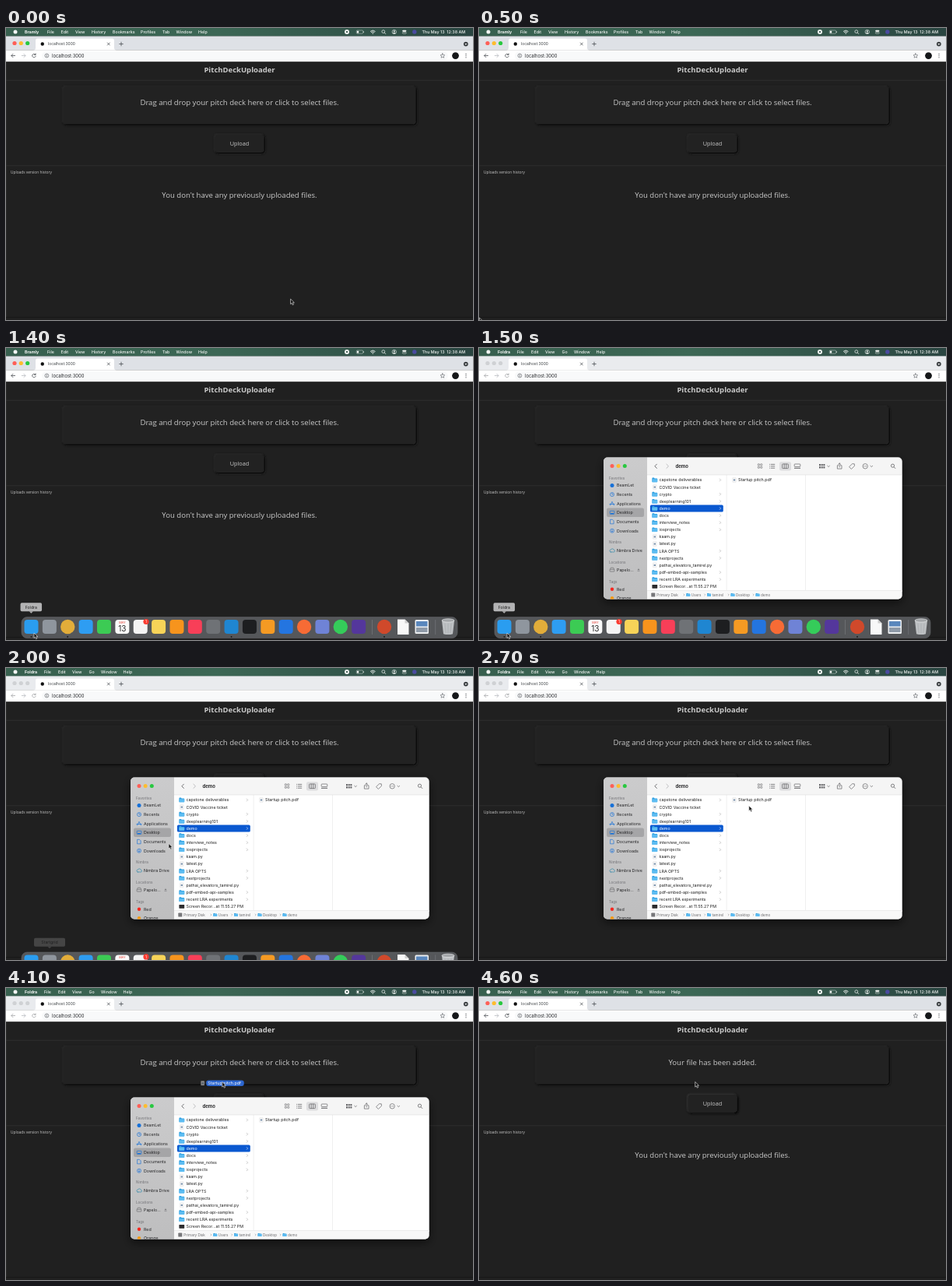
These frames come from a looping animation (600x375 px, 5 s). An HTML page:

```html
<!DOCTYPE html>
<html lang="en">
<head>
<meta charset="utf-8">
<title>Pitch deck upload</title>
<style>
html, body { margin: 0; width: 100%; height: 100%; overflow: hidden; background: #202020; }
svg { display: block; width: 100vw; height: 100vh; }
text { font-family: Inter, "Liberation Sans", sans-serif; white-space: pre; }
.page text { font-family: "Open Sans", "Noto Sans", sans-serif; }
</style>
</head>
<body>
<svg id="stage" viewBox="0 0 600 375" xmlns="http://www.w3.org/2000/svg"></svg>
<script>
const LOOP = 5000, STEP = 100;

// ---- drawing helpers ----
const rect = (x, y, w, h, fill, r = 0, extra = '') =>
  `<rect x="${x}" y="${y}" width="${w}" height="${h}" rx="${r}" fill="${fill}" ${extra}/>`;
const dot = (x, y, r, fill, extra = '') => `<circle cx="${x}" cy="${y}" r="${r}" fill="${fill}" ${extra}/>`;
const line = (d, color, w = 0.7, extra = '') =>
  `<path d="${d}" fill="none" stroke="${color}" stroke-width="${w}" stroke-linecap="round" stroke-linejoin="round" ${extra}/>`;
const shape = (d, fill, extra = '') => `<path d="${d}" fill="${fill}" ${extra}/>`;
// y is the middle of the capital letters
const text = (x, y, size, str, fill, extra = '') =>
  `<text x="${x}" y="${(y + size * 0.36).toFixed(2)}" font-size="${size}" fill="${fill}" ${extra}>${str}</text>`;
const group = (id, body, extra = '') => `<g id="${id}" ${extra}>${body}</g>`;
const MID = ' text-anchor="middle"', BOLD = ' font-weight="700"', MEDIUM = ' font-weight="500"';

const defs = `<defs>
  <linearGradient id="bar"><stop offset="0" stop-color="#38604f"/><stop offset=".45" stop-color="#3c6755"/>
    <stop offset="1" stop-color="#2a4541"/></linearGradient>
  <linearGradient id="side" x2="0" y2="1"><stop offset="0" stop-color="#cbcbcc"/><stop offset="1" stop-color="#bebebf"/></linearGradient>
  <filter id="raised" x="-20%" y="-40%" width="140%" height="190%">
    <feDropShadow dx="-1" dy="-1" stdDeviation="1" flood-color="#2b2b2b"/>
    <feDropShadow dx="1.4" dy="1.4" stdDeviation="1.6" flood-color="#141414"/></filter>
  <filter id="lifted" x="-20%" y="-40%" width="140%" height="190%">
    <feDropShadow dx="-1" dy="-1" stdDeviation="1" flood-color="#343434"/>
    <feDropShadow dx="1.6" dy="1.6" stdDeviation="1.6" flood-color="#0b0b0b"/></filter>
  <filter id="cast" x="-10%" y="-15%" width="120%" height="140%">
    <feDropShadow dx="0" dy="4" stdDeviation="6" flood-color="#000" flood-opacity=".6"/></filter>
  <clipPath id="frame"><rect x="160" y="140.5" width="383.5" height="182" rx="5"/></clipPath>
</defs>`;

// ---- menu bar ----
function menu(id, items) {
  return group(id, items.map(([x, label], i) =>
    text(x, 5, 5.3, label, '#f2f5f3', i ? MEDIUM : BOLD)).join(''));
}

function menuBar() {
  const w = '#f2f5f3';
  return rect(0, 0, 600, 10.3, 'url(#bar)') + dot(12, 5, 2.5, w) +
    menu('webMenu', [[24, 'Bramly'], [53, 'File'], [70.5, 'Edit'], [89, 'View'], [110, 'History'],
      [137, 'Bookmarks'], [173, 'Profiles'], [201, 'Tab'], [218.5, 'Window'], [247, 'Help']]) +
    menu('fileMenu', [[24, 'Foldra'], [49, 'File'], [67, 'Edit'], [85, 'View'], [106.5, 'Go'],
      [122, 'Window'], [150.5, 'Help']]) +
    dot(438, 5, 3, w) + rect(436.9, 3.9, 2.2, 2.2, '#4d6a60', 0.3) +
    rect(450.3, 3, 8.4, 4.2, 'none', 1, `stroke="${w}" stroke-width=".5" opacity=".8"`) +
    rect(451, 3.7, 2.2, 2.8, w, 0.4) + rect(459.2, 4.3, 0.7, 1.6, w) +
    line('M468.4 4.2q2.9-2.5 5.8 0M469.5 5.5q1.8-1.5 3.6 0', w, 0.9) + dot(471.3, 7, 0.7, w) +
    dot(484.8, 4.6, 1.9, 'none', `stroke="${w}" stroke-width=".7"`) + line('M486.3 6.1l1.6 1.6', w) +
    dot(498.8, 5, 2.7, 'none', `stroke="${w}" stroke-width=".6"`) + dot(498.8, 4.2, 1, w) + shape('M496.9 6.9q1.9-2.2 3.8 0z', w) +
    rect(509.2, 2.7, 5.2, 2, w, 1) + rect(509.4, 5.5, 4.9, 1.7, 'none', 0.9, `stroke="${w}" stroke-width=".5"`) +
    dot(524.8, 5, 2.7, '#4a4aa0') +
    text(534.5, 5, 5.3, 'Thu May 13  12:38 AM', w, MEDIUM);
}

// ---- browser frame ----
const lights = (xs, y, r, colors) => xs.map((x, i) => dot(x, y, r, colors[i % colors.length])).join('');
const RGB = ['#fe5f57', '#febc2e', '#28c840'];

function browser() {
  const ink = '#4d5156';
  return rect(0, 10.3, 600, 18, '#dee1e6') +
    group('pale', rect(0, 10.3, 600, 18, '#e9ebee') + lights([11, 19.3, 27.7], 19.5, 2.6, ['#cfd1d4'])) +
    group('vivid', lights([11, 19.3, 27.7], 19.5, 2.6, RGB)) +
    shape('M35 28.5q3 0 3-3V16q0-2.5 2.5-2.5h96q2.5 0 2.5 2.5v9.5q0 3 3 3z', '#fff') +
    dot(46.8, 20.5, 2.2, '#111') + text(54, 20.5, 4.95, 'localhost:3000', '#3c4043') +
    line('M130.3 19l3 3m0-3l-3 3M145.7 20.5h4.6m-2.3-2.3v4.6', ink, 0.8) +
    dot(590.8, 20.6, 2.9, '#3c4043') + shape('M589.3 20h3l-1.5 1.7z', '#fff') +
    rect(0, 28.3, 600, 14.9, '#fff') + rect(46, 30.3, 522, 10.8, '#f8f9fa', 5.4) +
    group('nav', line('M11.6 35.5H7m2-2.2l-2.2 2.2 2.2 2.2', ink, 0.8) +
      line('M37.9 34.2a2.3 2.3 0 1 0 .3 2.1M38.1 32.9v1.6h-1.6', ink, 0.8)) +
    line('M20.3 35.5h4.6m-2-2.2l2.2 2.2-2.2 2.2', '#b9bcc0', 0.8) +
    dot(52.4, 35.5, 2.4, 'none', `stroke="${ink}" stroke-width=".6"`) + line('M52.4 35.3v1.3m0-2.4v.1', ink, 0.6) +
    text(59, 35.5, 5.85, 'localhost:3000', '#27292c') +
    line('M560.9 32.7l.85 1.9 2 .2-1.5 1.4.4 2-1.75-1-1.75 1 .4-2-1.5-1.4 2-.2z', ink, 0.55) +
    dot(577.5, 35.6, 4.4, '#151719') +
    [33.4, 35.6, 37.8].map(y => dot(591, y, 0.65, ink)).join('');
}

// ---- web page ----
function page() {
  const ink = '#c9c9c9';
  const button = filter => rect(268.5, 137, 63, 23, '#202020', 4, `filter="url(#${filter})"`);
  return group('web',
    rect(0, 43.2, 600, 331.8, '#202020') +
    text(300, 53.6, 9.5, 'PitchDeckUploader', ink, MID + BOLD) +
    rect(0, 66.8, 600, 0.9, '#303030') + rect(0, 176.4, 600, 0.8, '#303030') +
    rect(0, 43.2, 0.6, 328, '#303030') + rect(0, 371, 600, 0.8, '#161616') +
    rect(73.5, 75.5, 453, 48, '#202020', 4, 'filter="url(#raised)"') +
    group('prompt', text(300, 95.8, 9.6, 'Drag and drop your pitch deck here or click to select files.', ink, MID)) +
    group('added', text(300, 95.8, 9.6, 'Your file has been added.', ink, MID)) +
    group('idle', button('raised')) + group('ready', button('lifted')) +
    text(300, 148.6, 7.3, 'Upload', ink, MID) +
    text(6, 185.4, 4.82, 'Uploads version history', ink) +
    text(300, 214.6, 9.54, "You don't have any previously uploaded files.", ink, MID), 'class="page"');
}

// ---- file window ----
const folder = (x, y, s = 1) =>
  `<g transform="translate(${x} ${y}) scale(${s})">` +
  shape('M-3.4-2.3q0-.6.6-.6h1.9l.8.8h2.9q.6 0 .6.6v3.6q0 .6-.6.6h-5.6q-.6 0-.6-.6z', '#2f9fe0') +
  rect(-3.4, -1.3, 6.8, 4, '#5cbcf2', 0.5) + '</g>';
const sheet = (x, y) => rect(x - 2.2, y - 2.8, 4.4, 5.6, '#fafafa', 0.4, 'stroke="#c9c9c9" stroke-width=".35"') +
  rect(x - 1.2, y - 1, 2.4, 2, '#7b93ad');
const chevron = (x, y, color, s = 1) => line(`M${x - 0.7 * s} ${y - 1.4 * s}l${1.4 * s} ${1.4 * s}l${-1.4 * s} ${1.4 * s}`, color, 0.55);

// A leading "/" marks a folder
const rows = ['/capstone deliverables', 'COVID Vaccine ticket', '/crypto', '/deeplearning101', '/demo', '/docs',
  '/interview_notes', '/iosprojects', 'kaam.py', 'latest.py', '/LRA OPTS', '/nextprojects',
  'pathai_elevators_tamirel.py', '/pdf-embed-api-samples', '/recent LRA experiments', 'Screen Recor...at 11.55.27 PM'];

function fileList() {
  return rows.map((row, i) => {
    const y = 169.5 + i * 9.12, on = row === '/demo', dir = row[0] === '/';
    const icon = dir ? folder(225.8, y) : i === 15 ? rect(222.4, y - 2.4, 6.8, 4.8, '#2b2b2d', 0.4) : sheet(225.8, y);
    return (on ? rect(220, y - 4.4, 93.8, 9, '#0a58d0', 1.6) : '') + icon +
      text(231.5, y, 5.3, dir ? row.slice(1) : row, on ? '#fff' : '#1e1e1e') +
      (dir ? chevron(310, y, on ? '#fff' : '#9a9a9a') : '');
  }).join('');
}

function sidebar() {
  const blue = '#1670d8';
  const heads = [[167, 'Favorites'], [249.7, 'Nimbra'], [275, 'Locations'], [300, 'Tags']];
  const items = [[176.5, 'BeamLet'], [188.1, 'Recents'], [199.7, 'Applications'], [211.3, 'Desktop'], [223, 'Documents'],
    [234.7, 'Downloads'], [260, 'Nimbra Drive'], [285, 'Papelo...'], [309.8, 'Red'], [321.3, 'Orange']];
  const ring = y => dot(171, y, 2.5, 'none', `stroke="${blue}" stroke-width=".65"`);
  return rect(160, 140, 56, 184, 'url(#side)') + rect(164, 205.6, 48, 11.4, '#a5a5a7', 2.2) +
    lights([171, 179.1, 187.3], 151.6, 2.5, RGB) +
    heads.map(([y, s]) => text(167, y, 4.6, s, '#7d7d80', MEDIUM)).join('') +
    items.map(([y, s]) => text(177, y, 5.3, s, '#232325')).join('') +
    dot(171, 176.5, 2.5, blue) + ring(188.1) + line('M171 186.5v1.7h1.2', blue, 0.6) +
    line('M168.6 202l2.4-4.7 2.4 4.7M167.8 200.5h6.4', blue, 0.7) +
    rect(168.2, 209.2, 5.7, 4.2, 'none', 0.7, `stroke="${blue}" stroke-width=".7"`) + rect(169, 212, 4, 1, blue) +
    line('M169 220.3h2.5l1.6 1.6v3.9H169z', blue, 0.65) +
    ring(234.7) + line('M171 233.3v2.6m-1-.9l1 1 1-1', blue, 0.6) +
    line('M169.3 262h3.9a1.3 1.3 0 0 0 .1-2.6 2 2 0 0 0-3.8-.4 1.5 1.5 0 0 0-.2 3z', '#2a86a8', 0.65) +
    rect(168.1, 284.3, 5.8, 2.8, 'none', 0.6, 'stroke="#606063" stroke-width=".6"') + line('M168.5 284l.9-1.8h3.2l.9 1.8', '#606063', 0.6) +
    shape('M203.4 285.2l1.6-1.9 1.6 1.9zM203.4 286h3.2v.6h-3.2z', '#77777a') +
    dot(171, 309.8, 2.2, '#f5271f') + dot(171, 321.3, 2.2, '#f59b14');
}

function toolbar() {
  const g = '#626265';
  const cell = (x, y) => rect(x, y, 2.1, 2.1, 'none', 0.4, `stroke="${g}" stroke-width=".6"`);
  const box = (x, y, w, h) => rect(x, y, w, h, 'none', 0.7, `stroke="${g}" stroke-width=".7"`);
  return rect(216, 140, 328, 23, '#f5f5f5') + rect(216, 162.7, 328, 0.5, '#d7d7d7') +
    line('M228.4 149.2l-2.6 2.6 2.6 2.6', g, 0.9) + line('M240.9 149.2l2.6 2.6-2.6 2.6', '#b6b6b8', 0.9) +
    text(252.5, 151.9, 6, 'demo', '#2c2c2e', BOLD) +
    cell(358.3, 148.8) + cell(361.7, 148.8) + cell(358.3, 152.2) + cell(361.7, 152.2) +
    line('M375.2 149.4h4.6M375.2 151.8h4.6M375.2 154.2h4.6M373.4 149.4h.1M373.4 151.8h.1M373.4 154.2h.1', g, 0.8) +
    rect(386, 146.2, 15, 11.2, '#dedee0', 2) + box(389.6, 149, 7.8, 5.6) + line('M392.2 149v5.6m2.6-5.6v5.6', g) +
    box(405.2, 149, 7.6, 3.4) + line('M405.4 154.3h7.2', g, 1) +
    [437, 439.7, 442.4].map(x => rect(x, 149, 2, 2.2, g, 0.3) + rect(x, 152.2, 2, 2.2, g, 0.3)).join('') +
    line('M447.7 151.3l1.4 1.3 1.4-1.3M502.9 151.3l1.4 1.3 1.4-1.3', g) +
    line('M461.8 150.8h-1.4v4.3h5.6v-4.3h-1.4M463.2 153v-5m-1.4 1.3l1.4-1.4 1.4 1.4', g) +
    line('M475.8 152.4l3.8-3.7 2.7.1.1 2.7-3.7 3.7z', g) +
    dot(496.2, 151.8, 3.2, 'none', `stroke="${g}" stroke-width=".7"`) + line('M494.7 151.8h.1m1.3 0h.1m1.3 0h.1', g, 0.8) +
    dot(531.5, 151.2, 2.1, 'none', `stroke="${g}" stroke-width=".8"`) + line('M533.1 152.8l1.8 1.8', g, 0.8);
}

function pathBar() {
  const parts = [[228.3, 'Primary Disk'], [272.8, 'Users'], [299.5, 'tamirel'], [330, 'Desktop'], [362, 'demo']];
  return rect(216, 311.3, 328, 12, '#f8f8f8') + rect(216, 311, 328, 0.5, '#dcdcdc') +
    rect(221.3, 314.6, 5, 5, '#77777a', 0.7) +
    parts.map(([x, s], i) => text(x, 317, 4.6, s, '#6a6a6d') +
      (i ? folder(x - 4, 317, 0.72) + chevron(x - 9.3, 317, '#8a8a8c', 0.75) : '')).join('');
}

function fileWindow() {
  return group('files', rect(160, 140.5, 383.5, 182, '#c4c4c5', 5, 'filter="url(#cast)"') +
    `<g clip-path="url(#frame)">` + rect(216, 163, 328, 150, '#fff') +
    rect(317.8, 163, 0.5, 148, '#dedede') + rect(419, 163, 0.5, 148, '#dedede') +
    fileList() + sheet(328, 169.5) + text(333, 169.5, 5.4, 'Startup pitch.pdf', '#1e1e1e') +
    pathBar() + toolbar() + sidebar() + '</g>');
}

// ---- dock ----
const apps = ['#2a9df0', '#8f969e', 'o#e2ad3a', '#2e9df2', '#3ccb54', 'day', '#f4f4f4', '#f7d358', '#f7941d', '#f83f58',
  '#6f7276', '#1f86d1', '#1d1e20', '#f59a23', '#2475e0', 'o#f76b35', '#6f83d6', 'o#35cc5a', '#54379c'];

function tip(id, x, w, label) {
  return group(id, rect(x - w / 2, 327.3, w, 11, '#b3b3b4', 1.8) +
    shape(`M${x - 2.5} 338.3h5l-2.5 2.4z`, '#b3b3b4') + text(x, 332.7, 5.2, label, '#1c1c1c', MID));
}

function dock() {
  const icons = apps.map((c, i) => {
    const x = 32.5 + i * 23.37;
    if (c === 'day') return rect(x - 9, 349, 18, 18, '#fafafa', 4) +
      text(x, 352.4, 3.8, 'MAY', '#e8392f', MID) + text(x, 360.3, 10, '13', '#2a2a2a', MID);
    return c[0] === 'o' ? dot(x, 358, 9.2, c.slice(1)) : rect(x - 9, 349, 18, 18, c, 4);
  }).join('');
  return group('dock', rect(20, 345.6, 560, 27, '#55575a', 7, 'stroke="#6b6d70" stroke-width=".5"') + icons +
    dot(180, 351.5, 3.6, '#fb3b30') + text(180, 351.5, 4.5, '1', '#fff', MID) +
    rect(470, 349, 0.6, 19, '#7b7d80') + rect(551.5, 349, 0.6, 19, '#7b7d80') +
    dot(486, 358, 9.2, '#d0492b') + shape('M503 348.5h9.5l5 5V368H503z', '#f8f8f8') + shape('M512.5 348.5v5h5z', '#cfcfcf') +
    rect(525.5, 349, 17.5, 18, '#eceef0', 1.5) + rect(527, 351, 14.5, 6.5, '#5a87bd') + rect(527, 359, 14.5, 6, '#8f9aa8') +
    shape('M560 350h16l-2 17.2q-6 1.8-12 0z', '#c9ccce', 'opacity=".9"') +
    `<ellipse cx="568" cy="350" rx="8" ry="2.2" fill="#a3a6a9" stroke="#e4e6e7" stroke-width=".7"/>` +
    line('M564 354l1 11.5M568 354v12M572 354l-1 11.5', '#a7aaac', 0.6) +
    [32.5, 79.2, 289.6, 486].map(x => dot(x, 370.8, 0.9, '#111')).join('') +
    tip('tipFiles', 32.3, 27.5, 'Foldra') + tip('tipGrid', 56, 40, 'Startgrid'));
}

// ---- pointer and dragged file ----
const ghost = group('ghost', `<g opacity=".5">${sheet(265.5, 151.3)}</g>` +
  rect(270, 147.4, 48.6, 7.6, '#2c66cf', 3.2) + text(272, 151.3, 5.4, 'Startup pitch.pdf', '#fff'));
const pointer = group('pointer',
  shape('M0 0v6.6l1.5-1.4 1.1 2.5 1.3-.6-1.1-2.4h2z', '#111', 'stroke="#f2f2f2" stroke-width=".6" stroke-linejoin="round"'));

const stage = document.getElementById('stage');
stage.innerHTML = defs + page() + browser() + menuBar() + fileWindow() + dock() + ghost + pointer;

// ---- motion ----
const $ = id => document.getElementById(id);
const DOCK_H = 32, OPEN = 1500, DROP = 4200;
const track = [
  [0, 365.6, 348], [100, 250, 356], [200, 90, 366], [300, 0.5, 372], [500, 0.5, 372], [800, 5.5, 363.5],
  [1000, 5.5, 363.5], [1300, 36, 366], [1600, 36, 366], [1700, 46, 361], [1800, 68, 338], [2000, 209, 225.5],
  [2200, 301, 184.5], [2300, 302, 184.5], [2400, 302, 184.5], [2700, 346.8, 177], [3000, 352, 167.7],
  [3100, 352, 167.7], [3600, 290.5, 149.5], [4100, 277.7, 120.5], [5000, 277.7, 120.5]];

function place(t) {
  const i = track.findIndex(k => k[0] > t);
  const a = track[i - 1], b = track[i], p = (t - a[0]) / (b[0] - a[0]);
  return [a[1] + (b[1] - a[1]) * p, a[2] + (b[2] - a[2]) * p];
}

function ease(t, from, to) {
  const p = Math.min(1, Math.max(0, (t - from) / (to - from)));
  return p * p * (3 - 2 * p);
}

const show = (id, on) => $(id).setAttribute('display', on ? 'inline' : 'none');
const move = (id, x, y) => $(id).setAttribute('transform', `translate(${x.toFixed(2)} ${y.toFixed(2)})`);

function render(t) {
  const [x, y] = place(t);
  const sunk = DOCK_H * (1 - ease(t, 500, 850) + ease(t, 1800, 2150));
  const open = t >= OPEN && t < DROP, ready = t >= DROP, added = t >= DROP + STEP;
  move('pointer', x, y);
  move('ghost', x - 290.5, y - 149.5);
  show('ghost', t >= 3200 && !ready);
  move('dock', 0, sunk);
  show('dock', sunk < DOCK_H);
  show('tipFiles', t >= 1200 && t < 1700);
  show('tipGrid', t >= 1700 && t < 2100);
  $('tipGrid').setAttribute('opacity', 1 - 0.75 * ease(t, 1800, 2000));
  show('files', open);
  show('fileMenu', open);
  show('webMenu', !open);
  show('pale', open);
  show('vivid', !open);
  $('nav').setAttribute('opacity', open ? 0.5 : 1);
  show('prompt', !added);
  show('added', added);
  show('idle', !ready);
  show('ready', ready);
}

const start = performance.now();
function tick() {
  const t = (performance.now() - start) % LOOP;
  render(Math.floor(t / STEP) * STEP);
  requestAnimationFrame(tick);
}
tick();
</script>
</body>
</html>
```
